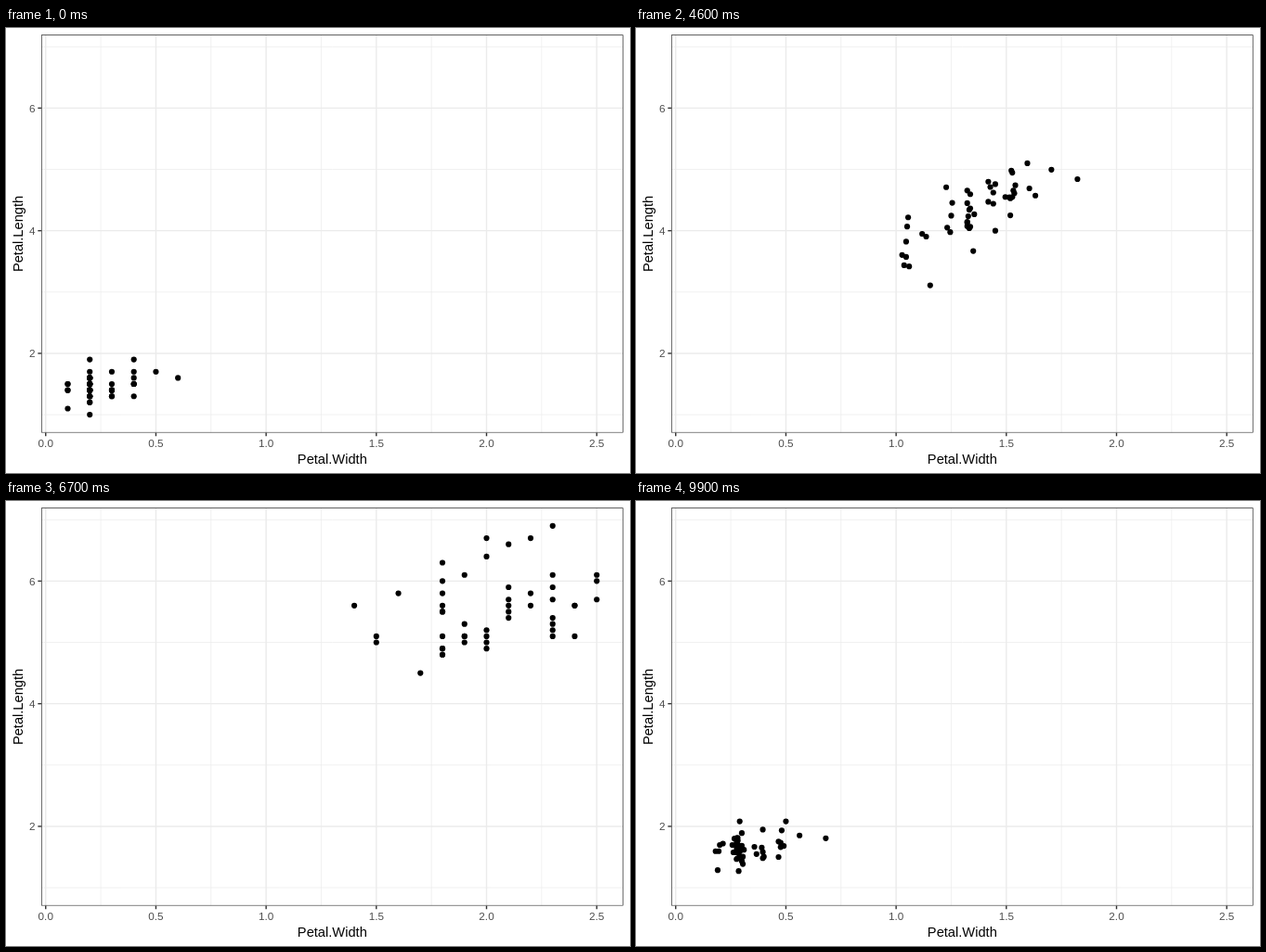
Recreate the animation shown at these times as an HTML page with a canvas. Size 672 by 480 pixels, loop 10000 ms.

```html
<!DOCTYPE html>
<html lang="en">
<head>
<meta charset="utf-8">
<title>Petal scatter plot</title>
<style>
  html, body { margin: 0; width: 100%; height: 100%; overflow: hidden; background: #fff; }
  canvas { display: block; width: 672px; height: 480px; }
</style>
</head>
<body>
<canvas id="plot" width="672" height="480"></canvas>
<script>
const ctx = document.getElementById('plot').getContext('2d');
const FONT = 'Helvetica, Arial, "Liberation Sans", sans-serif';
const STEP = 100, STEPS = 100;
const panel = { l: 38, t: 7.33, r: 664.67, b: 436.6 };

// Petal measurements in millimetres, one row per flower.
const setosa = {
  len: [14, 14, 13, 15, 14, 17, 14, 15, 14, 15, 15, 16, 14, 11, 12, 15, 13, 14, 17, 15,
        17, 15, 10, 17, 19, 16, 16, 15, 14, 16, 16, 15, 15, 14, 15, 12, 13, 14, 13, 15,
        13, 13, 13, 16, 19, 14, 16, 14, 15, 14],
  wid: [2, 2, 2, 2, 2, 4, 3, 2, 2, 1, 2, 2, 1, 1, 2, 4, 4, 3, 3, 3,
        2, 4, 2, 5, 2, 2, 4, 2, 2, 2, 2, 4, 1, 2, 2, 2, 2, 1, 2, 2,
        3, 3, 2, 6, 4, 3, 2, 2, 2, 2]
};
const versicolor = {
  len: [47, 45, 49, 40, 46, 45, 47, 33, 46, 39, 35, 42, 40, 47, 36, 44, 45, 41, 45, 39,
        48, 40, 49, 47, 43, 44, 48, 50, 45, 35, 38, 37, 39, 51, 45, 45, 47, 44, 41, 40,
        44, 46, 40, 33, 42, 42, 42, 43, 30, 41],
  wid: [14, 15, 15, 13, 15, 13, 16, 10, 13, 14, 10, 15, 10, 14, 13, 14, 15, 10, 15, 11,
        18, 13, 15, 12, 13, 14, 14, 17, 15, 10, 11, 10, 12, 16, 15, 16, 15, 13, 13, 13,
        12, 14, 12, 10, 13, 12, 13, 13, 11, 13]
};
const virginica = {
  len: [60, 51, 59, 56, 58, 66, 45, 63, 58, 61, 51, 53, 55, 50, 51, 53, 55, 67, 69, 50,
        57, 49, 67, 49, 57, 60, 48, 49, 56, 58, 61, 64, 56, 51, 56, 61, 56, 55, 48, 54,
        56, 51, 51, 59, 57, 52, 50, 52, 54, 51],
  wid: [25, 19, 21, 18, 22, 21, 17, 18, 18, 25, 20, 19, 21, 20, 24, 23, 18, 22, 23, 15,
        23, 20, 20, 18, 21, 18, 18, 18, 21, 16, 19, 20, 22, 15, 14, 23, 24, 18, 18, 21,
        24, 23, 19, 23, 25, 23, 19, 20, 23, 18]
};

// Each leg moves every flower linearly from one species to the next.
const legs = [
  { from: setosa, to: versicolor, start: 11, steps: 22 },
  { from: versicolor, to: virginica, start: 45, steps: 22 },
  { from: virginica, to: setosa, start: 79, steps: 21 }
];

const px = v => panel.l + (v + 0.02) / 2.64 * (panel.r - panel.l);
const py = v => panel.b - (v - 0.705) / 6.49 * (panel.b - panel.t);
const mix = (a, b, p) => a + (b - a) * p;

function line(x1, y1, x2, y2, color, width) {
  ctx.strokeStyle = color;
  ctx.lineWidth = width;
  ctx.beginPath();
  ctx.moveTo(x1, y1);
  ctx.lineTo(x2, y2);
  ctx.stroke();
}

function text(str, x, y, size, color, align) {
  ctx.font = size + 'px ' + FONT;
  ctx.fillStyle = color;
  ctx.textAlign = align;
  ctx.fillText(str, x, y);
}

function grid(xs, ys, width) {
  for (const y of ys) line(panel.l, py(y), panel.r, py(y), '#ebebeb', width);
  for (const x of xs) line(px(x), panel.t, px(x), panel.b, '#ebebeb', width);
}

function points(step) {
  const leg = legs.filter(g => step >= g.start).pop() || legs[0];
  const p = Math.min(1, Math.max(0, (step - leg.start) / leg.steps));
  const { from, to } = leg;
  ctx.fillStyle = '#000';
  from.len.forEach((len, i) => {
    const x = px(mix(from.wid[i], to.wid[i], p) / 10);
    const y = py(mix(len, to.len[i], p) / 10);
    ctx.beginPath();
    ctx.arc(x, y, 3.08, 0, Math.PI * 2);
    ctx.fill();
  });
}

function axes(xs, ys) {
  for (const x of xs) {
    line(px(x), panel.b, px(x), panel.b + 3.67, '#333', 1.42);
    text(x.toFixed(1), px(x), 451.9, 11.73, '#4d4d4d', 'center');
  }
  for (const y of ys) {
    line(panel.l - 3.67, py(y), panel.l, py(y), '#333', 1.42);
    text(String(y), panel.l - 6.6, py(y) + 4.2, 11.73, '#4d4d4d', 'right');
  }
  text('Petal.Width', (panel.l + panel.r) / 2, 469.8, 14.67, '#000', 'center');
  ctx.save();
  ctx.translate(17.9, (panel.t + panel.b) / 2);
  ctx.rotate(-Math.PI / 2);
  text('Petal.Length', 0, 0, 14.67, '#000', 'center');
  ctx.restore();
}

function draw(step) {
  const w = panel.r - panel.l, h = panel.b - panel.t;
  const xs = [0, 0.5, 1, 1.5, 2, 2.5], ys = [2, 4, 6];
  ctx.fillStyle = '#fff';
  ctx.fillRect(0, 0, 672, 480);

  ctx.save();
  ctx.beginPath();
  ctx.rect(panel.l, panel.t, w, h);
  ctx.clip();
  grid([0.25, 0.75, 1.25, 1.75, 2.25], [1, 3, 5, 7], 0.71);
  grid(xs, ys, 1.42);
  points(step);
  ctx.strokeStyle = '#333';
  ctx.lineWidth = 1.42;
  ctx.strokeRect(panel.l, panel.t, w, h);
  ctx.restore();

  axes(xs, ys);
}

function tick() {
  draw(Math.floor(performance.now() / STEP) % STEPS);
  requestAnimationFrame(tick);
}
tick();
</script>
</body>
</html>
```
